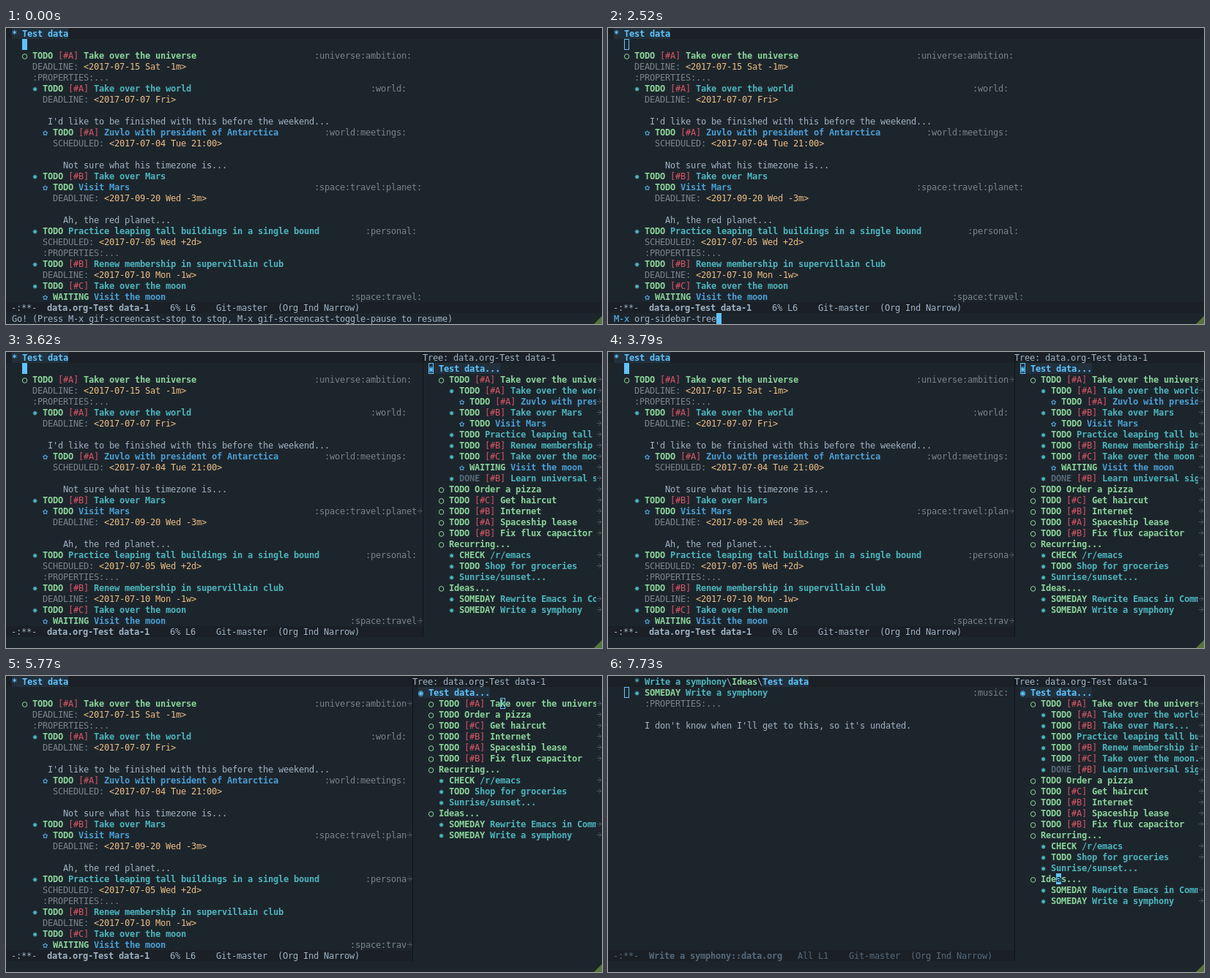
These frames come from a looping animation (814 px wide and 405 px high, 8 s). An HTML page with a canvas:

```html
<!DOCTYPE html>
<html lang="en">
<head>
<meta charset="utf-8">
<title>Outline sidebar</title>
<style>
html, body { margin: 0; width: 100%; height: 100%; overflow: hidden; background: #1d252c; }
canvas { display: block; }
</style>
</head>
<body>
<canvas id="stage" width="814" height="405"></canvas>
<script>
const ctx = document.getElementById('stage').getContext('2d');
const W = 814, H = 405, CELL = 7, LINE = 15, FRINGE = 8, LOOP = 8000;
const color = {
  bg: '#1d252c', bar: '#1a2026', border: '#0e1318', fg: '#a0b3c5', dim: '#56697a',
  meta: '#79838b', date: '#ebbf83', red: '#d95468', green: '#8bd49c', blue: '#5ec4ff',
  highlight: '#22303c', arrow: '#4b555e', corner: '#55733c',
};
const levelColor = [, color.blue, color.green, '#4db5bd', '#4a9fd4'];
const bullets = [, '◉', '○', '✸', '✿'];

// A leading digit marks a heading of that level; "@n" places its tags at column n.
const fullText = `
2 TODO [#A] Take over the universe@59:universe:ambition:
    DEADLINE: <2017-07-15 Sat -1m>
    :PROPERTIES:...
3 TODO [#A] Take over the world@70:world:
      DEADLINE: <2017-07-07 Fri>

       I'd like to be finished with this before the weekend...
4 TODO [#A] Zuvlo with president of Antarctica@61:world:meetings:
        SCHEDULED: <2017-07-04 Tue 21:00>

          Not sure what his timezone is...
3 TODO [#B] Take over Mars
4 TODO Visit Mars@59:space:travel:planet:
        DEADLINE: <2017-09-20 Wed -3m>

          Ah, the red planet...
3 TODO Practice leaping tall buildings in a single bound@69:personal:
      SCHEDULED: <2017-07-05 Wed +2d>
      :PROPERTIES:...
3 TODO [#B] Renew membership in supervillain club
      DEADLINE: <2017-07-10 Mon -1w>
3 TODO [#C] Take over the moon
4 WAITING Visit the moon@66:space:travel:`.split('\n');

const views = {
  all: { lines: fullText, name: 'data.org-Test data-1', place: '    6% L6' },
  rewrite: entry('Rewrite Emacs in Common Lisp', ['      :PROPERTIES:...']),
  write: entry('Write a symphony', ['      :PROPERTIES:...', '',
    "      I don't know when I'll get to this, so it's undated."], '@70:music:'),
};

const subtree = `3 TODO [#A] Take over the world
4 TODO [#A] Zuvlo with president of Antarctica
3 TODO [#B] Take over Mars
4 TODO Visit Mars
3 TODO Practice leaping tall buildings in a single bound
3 TODO [#B] Renew membership in supervillain club
3 TODO [#C] Take over the moon
4 WAITING Visit the moon
3 DONE [#B] Learn universal sign language`.split('\n');
const others = `2 TODO Order a pizza
2 TODO [#C] Get haircut
2 TODO [#B] Internet
2 TODO [#A] Spaceship lease
2 TODO [#B] Fix flux capacitor
2 Recurring...
3 CHECK /r/emacs
3 TODO Shop for groceries
3 Sunrise/sunset...
2 Ideas...
3 SOMEDAY Rewrite Emacs in Common Lisp
3 SOMEDAY Write a symphony`.split('\n');
const children = subtree.filter(line => line[0] === '3')
  .map(line => /world|Mars|moon/.test(line) ? line + '...' : line);
const treeOf = (rows, dots = '') =>
  ['1 Test data...', '2 TODO [#A] Take over the universe' + dots, ...rows, ...others];
const trees = { open: treeOf(subtree), folded: treeOf([], '...'), children: treeOf(children) };

function entry(title, body, tags = '') {
  return { title, lines: [`3 SOMEDAY ${title}${tags}`, ...body], name: title + '::data.org', place: '   All L1' };
}

// Cursors: [column, row, filled, character below]
const HOME = [2, 1, true], HOME_IDLE = [2, 1, false];
const TAKE = [16, 2, true, 'k'], TAKE_IDLE = [16, 2, false];
const command = 'org-sidebar-tree';
const keyTimes = [460, 560, 660, 770, 870, 970, 1120, 1280, 1380, 1540, 1640, 1740, 1920, 1960, 2100, 2520];
const resizeTimes = [3360, 3410, 3490, 3560, 3620, 3700, 3790];

const timeline = [
  [0, { view: 'all', active: true, cursor: HOME, split: W, typed: null, tree: 'open', treeCursor: [0, 1, false],
    echo: 'Go! (Press M-x gif-screencast-stop to stop, M-x gif-screencast-toggle-pause to resume)' }],
  [350, { echo: '', typed: '', cursor: HOME_IDLE }],
  ...keyTimes.map((t, i) => [t, { typed: command.slice(0, i + 1) }]),
  [3030, { typed: null, cursor: HOME, split: 603 }],
  ...resizeTimes.map((t, i) => [t, { split: 597 - i * CELL }]),
  [4110, { active: false, cursor: HOME_IDLE, treeCursor: TAKE }],
  [4640, { active: true, cursor: null, tree: 'folded', treeCursor: TAKE_IDLE }],
  [5170, { tree: 'children' }],
  [5770, { tree: 'folded' }],
  [6440, { tree: 'children' }],
  [6530, { active: false, cursor: HOME_IDLE, treeCursor: [16, 19, true, 'w'] }],
  [7060, { view: 'rewrite', active: true, cursor: HOME, treeCursor: [16, 19, false] }],
  [7140, { active: false, cursor: HOME_IDLE, treeCursor: [16, 20, true, 't'] }],
  [7650, { view: 'write', active: true, cursor: HOME, treeCursor: [16, 20, false] }],
  [7730, { active: false, cursor: HOME_IDLE, treeCursor: [7, 18, true, 'a'] }],
];

function fill(c, x, y, w, h) {
  ctx.fillStyle = c;
  ctx.fillRect(x, y, w, h);
}

// Writes on the character grid and returns the x after the last cell.
function write(str, x, row, c, bold = false) {
  ctx.font = `${bold ? 'bold ' : ''}12px "DejaVu Sans Mono", monospace`;
  ctx.fillStyle = c;
  for (const ch of str) {
    if (ch !== ' ') ctx.fillText(ch, x, row * LINE + 12);
    x += CELL;
  }
  return x;
}

function drawCursor(cursor, left) {
  if (!cursor) return;
  const [col, row, filled, ch] = cursor, x = left + col * CELL, y = row * LINE;
  if (filled) {
    fill(color.blue, x, y, CELL, LINE);
    if (ch) write(ch, x, row, color.bg, true);
  } else {
    ctx.strokeStyle = color.blue;
    ctx.strokeRect(x + 0.5, y + 0.5, CELL - 1, LINE - 1);
  }
}

function drawArrow(x, row) {
  const y = row * LINE + 7.5;
  ctx.strokeStyle = color.arrow;
  ctx.beginPath();
  ctx.moveTo(x + 1, y);
  ctx.lineTo(x + 7, y);
  ctx.moveTo(x + 3.5, y - 3.5);
  ctx.lineTo(x + 7, y);
  ctx.lineTo(x + 3.5, y + 3.5);
  ctx.stroke();
}

function drawHeading(line, left, row) {
  const [, level, todo = '', priority = '', title, tagCol, tags] =
    line.match(/^(\d) ([A-Z]{4,} )?(\[#.\] )?([^@]*)(?:@(\d+)(.*))?$/);
  const c = levelColor[level], indent = left + (level - 1) * 2 * CELL;
  if (level === '1') fill(color.highlight, left, row * LINE, (title.length + 2) * CELL, LINE);
  write(bullets[level], indent, row, c, true);
  let x = write(todo, indent + 2 * CELL, row, todo === 'DONE ' ? color.dim : color.green, true);
  x = write(priority, x, row, color.red);
  x = write(title, x, row, c, true);
  return tags ? write(tags, left + tagCol * CELL, row, color.meta) : x;
}

function drawBody(line, left, row) {
  const [, indent, keyword = '', date = '', rest] =
    line.match(/^( *)([A-Z]{4,}: |:PROPERTIES:\.\.\.)?(<.*>)?(.*)$/);
  let x = write(keyword, left + indent.length * CELL, row, color.meta);
  x = write(date, x, row, color.date);
  return write(rest, x, row, color.fg);
}

function drawPane(lines, x, right, cursor, isTree) {
  const left = x + FRINGE, end = right - FRINGE;
  const cut = [];
  ctx.save();
  ctx.beginPath();
  ctx.rect(left, LINE, end - left, H);
  ctx.clip();
  lines.forEach((line, i) => {
    const row = i + 1;
    const stop = (/^\d/.test(line) ? drawHeading : drawBody)(line, left, row);
    // Tree entries with a keyword carry tags beyond the edge.
    if (stop > end || isTree && /^\d [A-Z]{4,} /.test(line)) cut.push(row);
  });
  drawCursor(cursor, left);
  ctx.restore();
  cut.forEach(row => drawArrow(end, row));
}

function drawHeader({ title }) {
  let x = FRINGE;
  if (title) {
    x = write('* ' + title, x + 4 * CELL, 0, levelColor[3], true);
    x = write('\\', x, 0, color.fg);
    x = write('Ideas', x, 0, color.green, true);
    x = write('\\', x, 0, color.fg);
  }
  const label = title ? 'Test data' : '* Test data';
  fill(color.highlight, x, 0, label.length * CELL, LINE);
  write(label, x, 0, color.blue, true);
}

function drawModeLine({ name, place }, active) {
  const c = active ? color.fg : color.dim;
  let x = write(' -:**-  ', 0, 25, c);
  x = write(name, x, 25, c, true);
  write(place + '    Git-master  (Org Ind Narrow)', x, 25, c);
}

function draw(s) {
  const view = views[s.view];
  fill(color.bg, 0, 0, W, H);
  fill(color.bar, 0, 0, W, LINE);
  fill(color.bar, 0, 25 * LINE, s.split, LINE);
  drawHeader(view);
  drawPane(view.lines, 0, s.split, s.cursor, false);
  drawModeLine(view, s.active);

  if (s.split < W) {
    fill(color.border, s.split, 0, 1, 26 * LINE);
    write('Tree: data.org-Test data-1', s.split, 0, color.fg);
    drawPane(trees[s.tree], s.split, W, s.treeCursor, true);
  }

  write(s.echo, FRINGE, 26, color.fg);
  if (s.typed !== null) {
    const x = write('M-x ', FRINGE, 26, color.blue);
    write(s.typed, x, 26, color.fg);
    drawCursor([s.typed.length, 26, true], x);
  }

  ctx.fillStyle = color.corner;
  ctx.beginPath();
  ctx.moveTo(W, 394);
  ctx.lineTo(W, H);
  ctx.lineTo(803, H);
  ctx.fill();
}

let start, shown;
function tick(now) {
  start ??= now;
  const t = (now - start) % LOOP;
  const past = timeline.filter(([time]) => time <= t);
  if (past.length !== shown) {
    shown = past.length;
    draw(Object.assign({}, ...past.map(([, change]) => change)));
  }
  requestAnimationFrame(tick);
}
requestAnimationFrame(tick);
</script>
</body>
</html>
```
